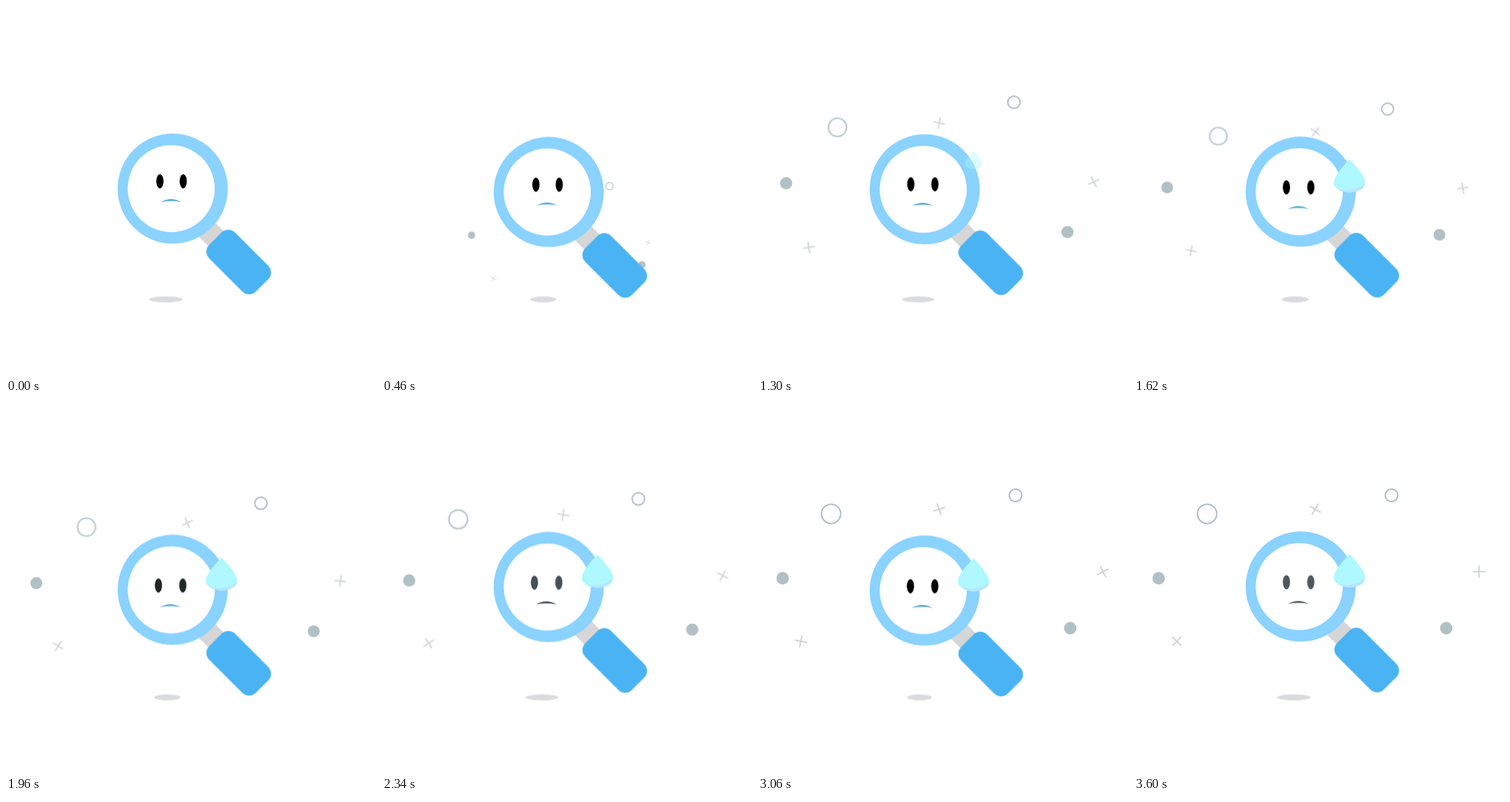
These frames come from a looping animation (500x500 px, 3.62 s). An HTML page without scripts:

```html
<!DOCTYPE html>
<html lang="en">
<head>
<meta charset="utf-8">
<title>Nothing found</title>
<style>
  html, body { margin: 0; width: 100%; height: 100%; overflow: hidden; background: #fff; }
  svg { display: block; width: 100vw; height: 100vh; }

  .bob, .shadow, .burst, .spin, .slide, .drop, .eyes, .mouth {
    animation: 3620ms linear infinite;
  }
  .bob { animation-name: bob; }
  .shadow { animation-name: shrink; }

  /* both bursts grow out of one point below the glass */
  .burst { transform-origin: 248.3px 417.7px; }
  .marks { animation-name: burst-marks; }
  .dots { animation-name: burst-dots; }
  .marks, .dots { fill: none; stroke: #b2bfc4; stroke-width: 2; }
  .cross { stroke: #d0d4d5; stroke-width: 1.9; }
  .solid { fill: #b1c0c4; stroke: none; }

  .spin { animation-name: spin; }
  .uneven { animation-name: spin-uneven; }

  .slide { animation-name: slide; }
  .drop { animation-name: drip; transform-origin: 291.3px 225.3px; }
  .eyes { animation-name: eye-tint; animation-timing-function: step-end; }
  .mouth { animation-name: mouth-tint; animation-timing-function: step-end; }

  @keyframes bob {
    0%, 33.149%, 66.298%, 99.448%, 100% { transform: none; }
    16.575%, 49.724%, 82.873% { transform: translateY(6px); }
  }
  @keyframes shrink {
    0%, 33.149%, 66.298%, 99.448%, 100% { transform: translate(216px, 396.5px); }
    16.575%, 49.724%, 82.873% { transform: translate(218.6px, 396.5px) scaleX(.7); }
  }
  @keyframes burst-marks {
    0%, 3.73% { transform: scale(0); opacity: 0; }
    7.5% { opacity: 0; }
    14% { opacity: 1; }
    23.8% { transform: scale(1.14); }
    39.78% { transform: scale(.88); }
    72%, 100% { transform: none; opacity: 1; }
  }
  @keyframes burst-dots {
    0% { transform: scale(0); opacity: 0; }
    4% { opacity: 0; }
    12% { opacity: 1; }
    23.8% { transform: scale(1.107); }
    39.78% { transform: scale(.937); }
    73.04%, 100% { transform: none; opacity: 1; }
  }
  @keyframes spin {
    from { transform: rotate(0deg); }
    to { transform: rotate(var(--turn)); }
  }
  @keyframes spin-uneven {
    0% { transform: rotate(0deg); }
    23.2% { transform: rotate(90deg); }
    35.9% { transform: rotate(100deg); }
    54.1% { transform: rotate(155deg); }
    100% { transform: rotate(301deg); }
  }
  @keyframes slide {
    0%, 23.8% { transform: none; }
    39.78%, 100% { transform: translate(var(--dx), var(--dy)); }
  }
  @keyframes drip {
    0%, 33.15% { transform: translateY(-31px) scale(.22); opacity: 0; }
    39.78%, 100% { transform: none; opacity: 1; }
  }
  @keyframes eye-tint {
    0% { fill: #000; }
    52.5% { fill: #222626; }
    59.4% { fill: #465059; }
    77.3% { fill: #000; }
    94%, 100% { fill: #50575d; }
  }
  @keyframes mouth-tint {
    0% { fill: #4fa9dc; }
    59.4% { fill: #3d454c; }
    77.3% { fill: #4f9fcf; }
    94%, 100% { fill: #50575d; }
  }
</style>
</head>
<body>
<svg viewBox="0 0 500 500">
  <defs>
    <path id="plus" d="M-8.5 0H8.5M0-8.5V8.5"/>
  </defs>

  <g class="burst marks">
    <circle cx="98.8" cy="148.5" r="13"/>
    <g class="cross">
      <g transform="translate(244.7 142.2)"><use href="#plus" class="spin uneven"/></g>
      <g transform="translate(57.8 320.7)"><use href="#plus" class="spin" style="--turn:226deg"/></g>
      <g transform="translate(466.3 226.6)"><use href="#plus" class="spin" style="--turn:181deg"/></g>
    </g>
  </g>
  <g class="burst dots">
    <circle cx="348" cy="123.5" r="8.5"/>
    <circle class="solid" cx="33.3" cy="235.5" r="8.4"/>
    <circle class="solid" cx="422" cy="303" r="8.4"/>
  </g>

  <ellipse class="shadow" rx="23" ry="4" fill="#dadbde"/>

  <g class="bob">
    <g transform="translate(314.5 346) rotate(45)">
      <rect x="-78" y="-15.2" width="45" height="29" fill="#d6d6d6"/>
      <rect x="-44.6" y="-24.8" width="89.2" height="49.6" rx="13" fill="#4ab3f4"/>
    </g>
    <circle cx="225.3" cy="246.7" r="74.4" fill="#8ad2ff"/>
    <circle cx="223.3" cy="246.7" r="58.8" fill="#fff"/>

    <g class="eyes">
      <ellipse class="slide" style="--dx:-2px;--dy:4px" cx="208" cy="236.8" rx="4.9" ry="9.6"/>
      <ellipse class="slide" style="--dx:-.6px;--dy:4px" cx="239.5" cy="236.8" rx="4.9" ry="9.6"/>
    </g>
    <g class="mouth">
      <path class="slide" style="--dx:-1px;--dy:5.2px" d="M209 265Q223 257 237 265Q223 262.2 209 265Z"/>
    </g>

    <g class="drop">
      <path fill="#aff8ff" d="M291.3 203C297 209 312.5 225 312.5 234S303 247.5 291.3 247.5S270 242 270 234S285 209 291.3 203Z"/>
      <path fill="#b8e4fe" d="M276 243.5Q298 247.5 312.2 236C310.5 243 302 247.5 291.3 247.5Q282 247.5 276 243.5Z"/>
    </g>
  </g>
</svg>
</body>
</html>
```
